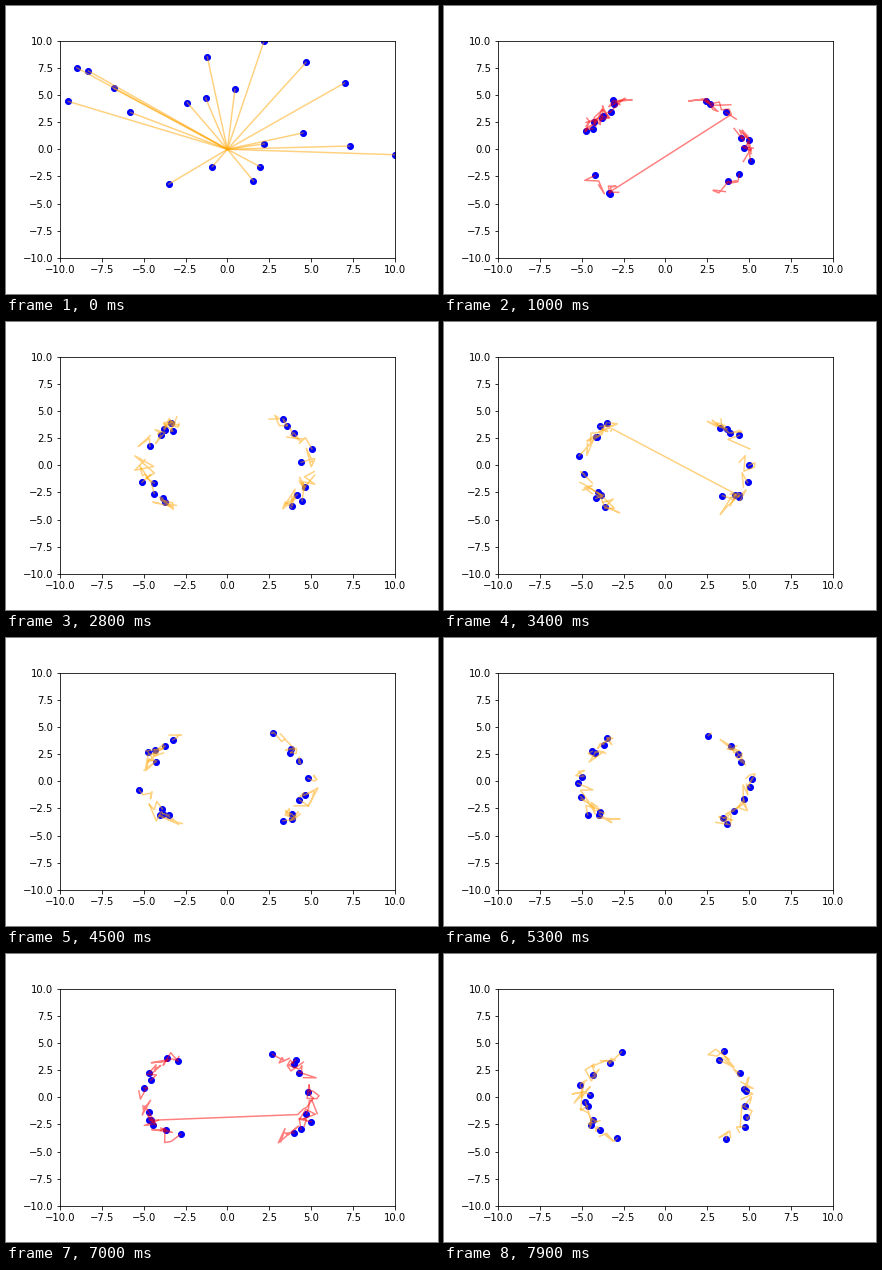
Animation, 432 px wide and 288 px high, one loop 8000 ms. Source, as a matplotlib script:

```python
import numpy as np
import matplotlib.pyplot as plt
from matplotlib.animation import FuncAnimation

FRAMES = 80
INTERVAL = 100
TRAIL = 7        # positions per trail
PERIOD = 10      # every tenth step is a long-jump step

# scattered starting positions; the last walker is the one that hops
START = np.array([
    (-1.3, 4.7), (-2.4, 4.3), (-1.2, 8.5), (-6.8, 5.6), (-9, 7.5),
    (-8.3, 7.2), (-5.8, 3.4), (-9.5, 4.4), (-3.5, -3.2), (-.9, -1.6),
    (7, 6.1), (.45, 5.5), (4.5, 1.5), (4.7, 8), (2.2, .5),
    (7.3, .3), (1.95, -1.6), (10, -.5), (1.55, -2.9), (2.2, 10)])
HOPS = [(0, 70), (9, 42), (10, 231), (19, 201), (20, 128), (29, 136),
        (30, -31), (59, -51), (60, 35), (69, -20), (70, 205), (79, 210)]

rng = np.random.default_rng(12)
steps = np.arange(FRAMES)


def smooth(u):
    u = np.clip(u, 0, 1)
    return u * u * (3 - 2 * u)


def moon(points, center):
    """Angles of the walkers on one arc, from the start order to an even spread."""
    x, y = points.T
    offset = (np.degrees(np.arctan2(y, x)) - center + 180) % 360 - 180
    rank = offset.argsort().argsort() / (len(offset) - 1) * 2 - 1
    early = 70 * np.tanh(offset / 70)[:, None]
    # crowded at the two horns first, evenly spaced at the end
    power = np.interp(steps, [20, FRAMES - 1], [0.35, 1])
    late = 47 * np.sign(rank)[:, None] * np.abs(rank)[:, None] ** power
    return center + early + (late - early) * smooth((steps - 10) / 24)


def walk():
    """Origin followed by one position per step, for every walker."""
    left = START[:, 0] < 0
    right = ~left
    right[-1] = False
    angle = np.empty((len(START), FRAMES))
    angle[left] = moon(START[left], 180)
    angle[right] = moon(START[right], 4)
    angle[-1] = np.interp(steps, *zip(*HOPS))

    wobble = rng.normal(0, 6, angle.shape).clip(-11, 11)
    wobble[-1] *= 0.3
    theta = np.radians(angle + wobble)
    radius = rng.normal(5, 0.28, angle.shape).clip(4.4, 5.6)
    path = np.stack([radius * np.cos(theta), radius * np.sin(theta)], axis=2)
    path += (START - path[:, 0])[:, None] * 0.35 ** steps[:, None]

    # a rejected proposal leaves the walker in place
    reject = rng.random(angle.shape) > 0.72
    reject[-1] = False
    for i in range(4, FRAMES):
        path[reject[:, i], i] = path[reject[:, i], i - 1]
    return np.concatenate([np.zeros((len(START), 1, 2)), path], axis=1)


paths = walk()

plt.rcParams.update({"font.family": "DejaVu Sans", "font.size": 10})
fig = plt.figure(figsize=(6, 4), dpi=72, facecolor="white")
fig.subplots_adjust(left=0.125, right=0.9, bottom=0.125, top=0.88)
ax = fig.add_subplot()
ticks = np.linspace(-10, 10, 9)
ax.set(xlim=(-10, 10), ylim=(-10, 10), xticks=ticks, yticks=ticks)
ax.xaxis.set_major_formatter("{x:.1f}")
ax.yaxis.set_major_formatter("{x:.1f}")

dots, = ax.plot([], [], "bo", ms=6)
trails = [ax.plot([], [], color="orange", alpha=0.5, lw=1.5)[0] for _ in paths]


def draw(i):
    dots.set_data(*paths[:, i + 1].T)
    color = "red" if i and i % PERIOD == 0 else "orange"
    for line, path in zip(trails, paths):
        line.set_data(*path[max(0, i + 2 - TRAIL):i + 2].T)
        line.set_color(color)
    return [dots, *trails]


anim = FuncAnimation(fig, draw, frames=FRAMES, interval=INTERVAL, repeat=True)
plt.show()
```
